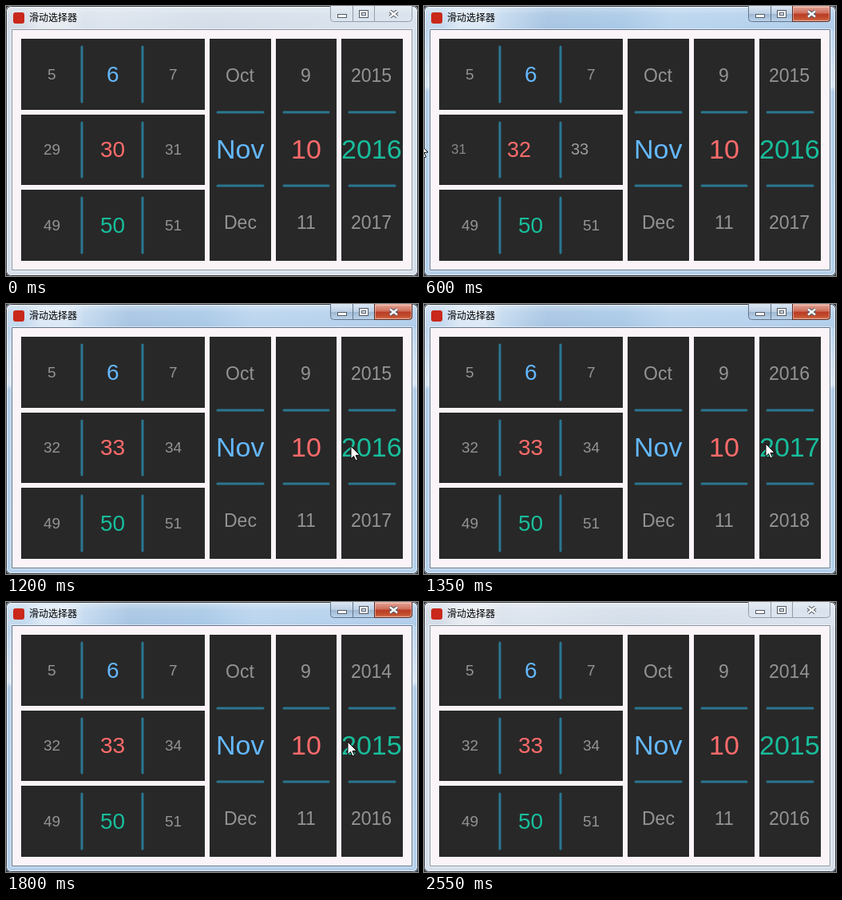
An HTML page with a canvas that plays this animation: 516x338 px, repeating every 2.7 s.

```html
<!DOCTYPE html>
<html lang="zh">
<head>
<meta charset="utf-8">
<title>滑动选择器</title>
<style>
  html, body { margin: 0; width: 100%; height: 100%; overflow: hidden; background: #303236; }
  canvas { display: block; }
</style>
</head>
<body>
<canvas id="stage" width="516" height="338"></canvas>
<script>
const ctx = document.getElementById('stage').getContext('2d');
const LOOP = 2700;
const BLUE = '#64b8ff', RED = '#ff6b6b', GREEN = '#18bd9b';
const MONTHS = ['Jan', 'Feb', 'Mar', 'Apr', 'May', 'Jun', 'Jul', 'Aug', 'Sep', 'Oct', 'Nov', 'Dec'];

// Each track lists [start time, value]; values hold until the next entry.
const tracks = {
  active: [[0, false], [600, true], [2550, false]],
  minute: [[0, 30], [600, 32 + 14 / 76], [750, 33]],
  year: [[0, 2016], [1350, 2017], [1500, 2016], [1650, 2015]],
  cursor: [[0, null], [450, [189, 159]], [600, [-6, 172]], [750, null], [900, [441, 184]],
    [1050, [437, 181]], [1200, [432, 178]], [1350, [428, 175]], [2100, null]]
};

function valueAt(track, t) {
  let value;
  for (const [start, v] of track) if (t >= start) value = v;
  return value;
}

function rect(x, y, w, h, fill) {
  ctx.fillStyle = fill;
  ctx.fillRect(x, y, w, h);
}

function outline(x, y, w, h, color, radius = 0) {
  ctx.strokeStyle = color;
  ctx.lineWidth = 1;
  ctx.beginPath();
  ctx.roundRect(x + .5, y + .5, w - 1, h - 1, radius);
  ctx.stroke();
}

function gradient(x0, y0, x1, y1, stops) {
  const g = ctx.createLinearGradient(x0, y0, x1, y1);
  for (const [at, color] of stops) g.addColorStop(at, color);
  return g;
}

function drawTitleBar(active) {
  const glass = active
    ? [[0, '#c3d8ee'], [.18, '#c6dbf0'], [.3, '#a6c4e2'], [.48, '#a8c8e6'], [.6, '#b9d4ee'], [1, '#b0cdea']]
    : [[0, '#d3dbe5'], [.25, '#dce4ee'], [.5, '#d3dde9'], [1, '#dae3ee']];
  rect(0, 0, 516, 30, gradient(0, 0, 516, 0, glass));
  rect(0, 0, 516, 30, gradient(0, 0, 0, 30,
    [[0, 'rgba(255,255,255,.4)'], [.35, 'rgba(255,255,255,.1)'], [1, 'rgba(255,255,255,0)']]));
  rect(22, 3, 76, 25, gradient(22, 0, 98, 0,
    [[0, 'rgba(255,255,255,0)'], [.3, 'rgba(255,255,255,.4)'], [.7, 'rgba(255,255,255,.4)'], [1, 'rgba(255,255,255,0)']]));

  ctx.fillStyle = '#c9281b';
  ctx.beginPath();
  ctx.roundRect(9, 8, 14, 14, 3);
  ctx.fill();
  ctx.fillStyle = '#000';
  ctx.font = '12px "Noto Sans CJK SC", "Noto Sans CJK", sans-serif';
  ctx.textAlign = 'left';
  ctx.fillText('滑动选择器', 29, 19);
}

function drawButtons(active) {
  const edge = active ? '#61758c' : '#929dab';
  ctx.save();
  ctx.beginPath();
  ctx.roundRect(406, -4, 103, 24, 4);
  ctx.clip();
  rect(406, 0, 103, 20, gradient(0, 0, 0, 20, active
    ? [[0, '#dce8f4'], [.48, '#bdd0e4'], [.5, '#9fb8d2'], [1, '#bdd5ec']]
    : [[0, '#e6ecf3'], [.5, '#dae3ed'], [1, '#dde6f0']]));
  if (active) rect(462, 0, 47, 20, gradient(0, 0, 0, 20,
    [[0, '#e4aa9d'], [.46, '#cf6b57'], [.5, '#b93b25'], [.8, '#c4512f'], [1, '#dd9573']]));
  rect(434, 0, 1, 20, edge);
  rect(461, 0, 1, 20, edge);
  ctx.restore();
  outline(406, -5, 103, 25, edge, 4);
  if (active) {
    outline(461, -5, 48, 25, '#5a2a2c', [0, 0, 4, 0]);
    outline(462, 1, 46, 18, 'rgba(255,225,210,.5)', [0, 0, 3, 0]);
  }

  const ink = '#535a66';
  rect(415, 10, 12, 5, ink);
  rect(416, 11, 10, 3, '#fff');
  rect(442, 5, 12, 10, ink);
  rect(443, 6, 10, 8, '#fff');
  rect(445, 8, 6, 4, ink);
  rect(446, 9, 4, 2, '#dce6f0');
  for (const [width, color] of [[4.6, ink], [2.4, '#fff']]) {
    ctx.strokeStyle = color;
    ctx.lineWidth = width;
    ctx.beginPath();
    ctx.moveTo(481, 6.5); ctx.lineTo(490, 13.5);
    ctx.moveTo(490, 6.5); ctx.lineTo(481, 13.5);
    ctx.stroke();
  }
}

function drawWindow(active) {
  rect(0, 0, 516, 338, '#303236');
  ctx.save();
  ctx.beginPath();
  ctx.roundRect(0, 0, 516, 338, 6);
  ctx.clip();
  rect(0, 0, 516, 338, active ? '#b3cfeb' : '#d5dfea');
  drawTitleBar(active);
  if (active) {
    const side = gradient(0, 30, 0, 338,
      [[0, '#bdd6ee'], [.23, '#dce8f5'], [.25, '#b2cee9'], [1, '#b5d2ec']]);
    rect(0, 30, 8, 308, side);
    rect(508, 30, 8, 308, side);
  }
  ctx.restore();
  outline(0, 0, 516, 338, '#363c45', 6);
  outline(1, 1, 514, 336, 'rgba(255,255,255,.65)', 5);
  drawButtons(active);
  outline(6, 28, 504, 304, 'rgba(255,255,255,.55)');
  outline(7, 29, 502, 302, active ? '#62758a' : '#8a939f');
  rect(8, 30, 500, 300, '#faf4f9');
}

function drawPicker({ x, y, w, h, color, value, label = String }) {
  const vertical = h > w;
  const length = vertical ? h : w;
  const step = Math.floor(length / 3);
  const cx = x + w / 2, cy = y + h / 2;
  rect(x, y, w, h, '#282828');

  ctx.strokeStyle = '#2a7690';
  ctx.lineWidth = 3;
  ctx.lineCap = 'round';
  ctx.beginPath();
  for (const d of [step, step * 2]) {
    if (vertical) {
      ctx.moveTo(x + 10, y + d); ctx.lineTo(x + w - 10, y + d);
    } else {
      ctx.moveTo(x + d, y + 10); ctx.lineTo(x + d, y + h - 10);
    }
  }
  ctx.stroke();
  ctx.lineCap = 'butt';

  ctx.save();
  ctx.beginPath();
  ctx.rect(x, y, w, h);
  ctx.clip();
  ctx.textAlign = 'left';
  const middle = Math.round(value);
  for (let n = middle - 1; n <= middle + 1; n++) {
    const shift = (n - value) * step;
    const size = Math.floor((length - Math.abs(shift)) / 8);
    ctx.font = `${size}px "Liberation Sans", Arial, sans-serif`;
    ctx.globalAlpha = n === middle ? 1 : 1 - Math.abs(shift) / length;
    ctx.fillStyle = n === middle ? color : '#c8c8c8';
    const text = label(n);
    const left = cx + (vertical ? 0 : shift) - ctx.measureText(text).width / 2;
    const baseline = cy + (vertical ? shift : 0) + size * .3465;
    ctx.fillText(text, Math.floor(left), Math.floor(baseline));
  }
  ctx.restore();
}

function drawCursor([x, y]) {
  ctx.save();
  ctx.translate(x, y);
  ctx.beginPath();
  for (const [px, py] of [[0, 0], [0, 16], [3.5, 12.5], [6, 18], [8.5, 17], [6, 11.5], [11, 11]]) {
    ctx.lineTo(px, py);
  }
  ctx.closePath();
  ctx.fillStyle = '#fff';
  ctx.fill();
  ctx.strokeStyle = '#000';
  ctx.lineWidth = 1;
  ctx.stroke();
  ctx.restore();
}

function draw() {
  const t = performance.now() % LOOP;
  const state = {};
  for (const name in tracks) state[name] = valueAt(tracks[name], t);

  drawWindow(state.active);
  const row = { x: 19, w: 230 }, column = { y: 41, h: 278 };
  drawPicker({ ...row, y: 41, h: 89, color: BLUE, value: 6 });
  drawPicker({ ...row, y: 136, h: 88, color: RED, value: state.minute });
  drawPicker({ ...row, y: 230, h: 89, color: GREEN, value: 50 });
  drawPicker({ ...column, x: 255, w: 77, color: BLUE, value: 10, label: n => MONTHS[n] });
  drawPicker({ ...column, x: 338, w: 76, color: RED, value: 10 });
  drawPicker({ ...column, x: 420, w: 77, color: GREEN, value: state.year });
  if (state.cursor) drawCursor(state.cursor);
  requestAnimationFrame(draw);
}

draw();
</script>
</body>
</html>
```
